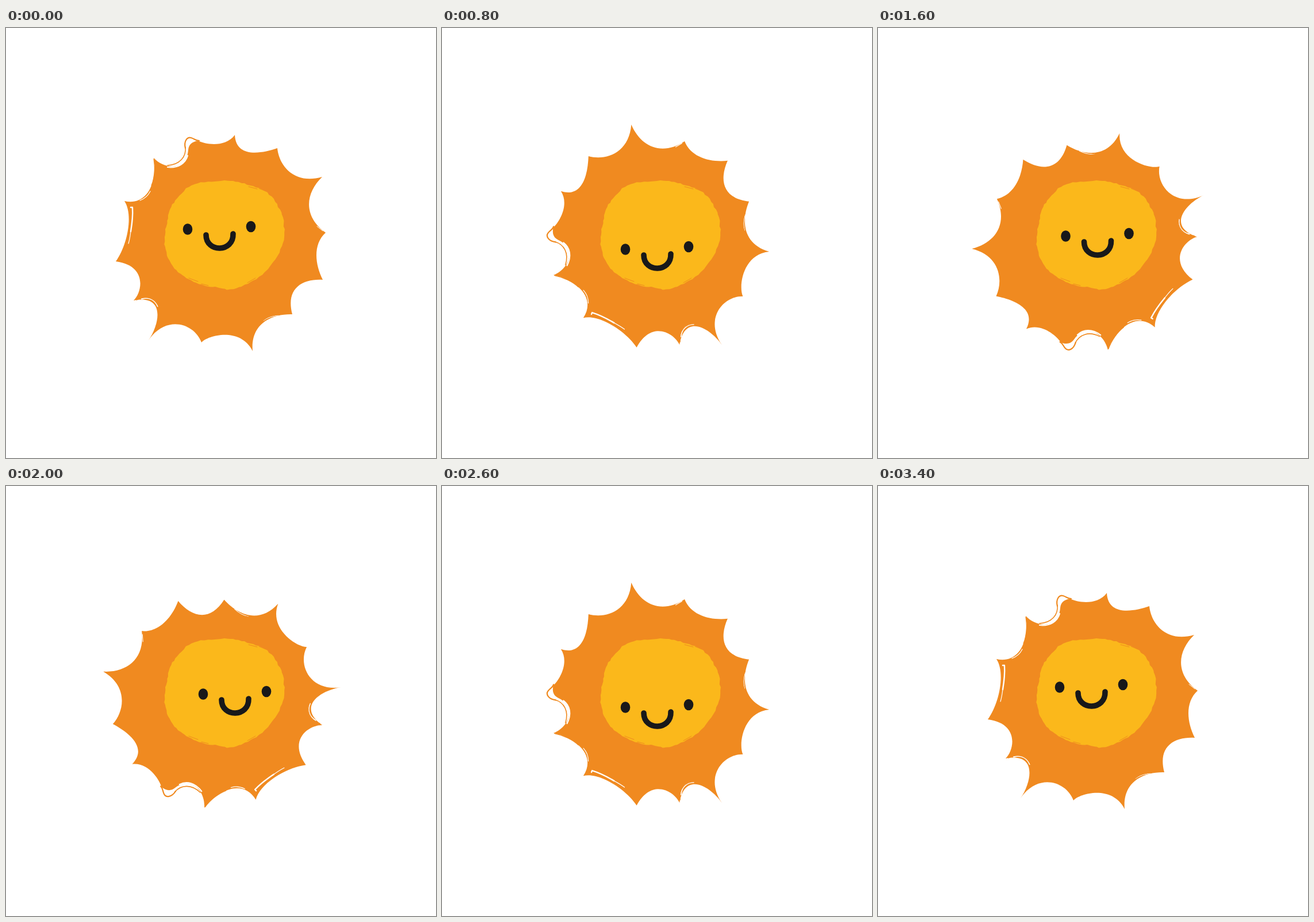
An HTML page for the animation above (3.6 s loop, 748x748 px).

```html
<!DOCTYPE html>
<html lang="en">
<head>
<meta charset="utf-8">
<title>Smiling sun</title>
<style>
  html, body { margin: 0; width: 100%; height: 100%; overflow: hidden; background: #fff; }
  svg { display: block; width: 100%; height: 100%; }
  .orange { fill: #f08a20; }
  .yellow { fill: #fbb81b; }
  .ink { fill: #18181a; }
  .line { fill: none; stroke-linecap: round; stroke-linejoin: round; }
  .gap { stroke: #fff; }
  .hair { stroke: #f08a20; }
</style>
</head>
<body>
<svg viewBox="0 0 748 748">
  <g id="rays">
    <path class="orange" d="M334 196
      C348 203 382 208 398 186 C400 226 443 219 472 209
      C475 240 502 273 550 259 C520 288 517 328 556 356
      C534 376 537 410 551 438 C516 436 486 452 498 498
      C461 497 425 515 429 562 C408 520 352 534 340 547
      C328 514 279 498 248 543 C268 514 277 463 222 474
      C238 458 245 413 191 406 C211 378 222 325 206 301
      C242 309 263 276 257 226 C275 246 314 250 317 212
      C318 202 324 198 334 196Z"/>
    <!-- dry brush streaks -->
    <g class="line gap">
      <path stroke-width="2.2" d="M316 222C312 236 299 244 281 242"/>
      <path stroke-width="2.4" d="M217 312L220 312"/>
      <path stroke-width="2.4" d="M220 313C221 328 219 342 217 354"/>
      <path stroke-width="1.2" d="M217 354C216 362 215 368 213 375"/>
      <path stroke-width="1.3" d="M258 238C258 250 256 260 254 269"/>
      <path stroke-width="1.2" d="M251 284C247 292 241 297 233 300"/>
      <path stroke-width="2.4" d="M236 471C250 467 260 474 264 484"/>
      <path stroke-width="1" d="M448 509C456 503 464 501 474 500"/>
      <path stroke-width="1" d="M541 345L551 353"/>
    </g>
    <g class="line hair">
      <path stroke-width="2.2" d="M312 209C309 197 315 189 322 191S329 196 336 196"/>
      <path stroke-width="1.6" d="M312 207C314 224 302 238 281 239"/>
      <path stroke-width="1.2" d="M257 228C260 244 258 262 253 274"/>
      <path stroke-width="1.5" d="M227 473C245 464 260 470 266 486"/>
      <path stroke-width="1" d="M443 514C450 504 462 499 476 499"/>
    </g>
  </g>
  <path id="disc" class="yellow"/>
  <g class="line hair" stroke-width="1">
    <path d="M422 276L437 280M440 279L452 284M318 435L334 441M340 445L352 448M420 443L434 435"/>
  </g>
  <g id="face">
    <ellipse class="ink" cx="316" cy="350" rx="8.3" ry="9.8"/>
    <ellipse class="ink" cx="426" cy="345.5" rx="8.3" ry="9.8"/>
    <path class="line" stroke="#18181a" stroke-width="9.6" d="M348 360C348 391 396 391 395 358"/>
  </g>
</svg>
<script>
  const $ = id => document.getElementById(id);
  const STEP = 200, COUNT = 9, LOOP = STEP * COUNT * 2;

  // Each pose: ray angle, face x, face y
  const poses = [
    [0, 0, 0], [-10, -5, 3.5], [-34.5, -18, 12],
    [-49.2, -9, 22], [-69.1, 3, 35], [-91.5, 24, 23],
    [-113.2, 45, 12], [-133, 27, 12], [-149.8, 10.5, 12]
  ];

  const rim = [
    [375, 266], [400, 267], [425, 274], [450, 283], [468, 302], [480, 325],
    [484, 350], [480, 380], [465, 408], [440, 433], [415, 447], [390, 455],
    [365, 451], [340, 447], [318, 437], [300, 425], [284, 405], [277, 380],
    [276, 360], [281, 335], [285, 315], [298, 296], [318, 276], [345, 268]
  ];

  let seed = 11;
  const rand = () => (seed = (seed * 16807) % 2147483647) / 2147483647;

  const spline = (a, b, c, d, t) =>
    b + t / 2 * (c - a + t * (2 * a - 5 * b + 4 * c - d + t * (3 * (b - c) + d - a)));

  function roughPath(pts, cuts, amount) {
    const n = pts.length, out = [];
    for (let i = 0; i < n; i++) {
      const [a, b, c, d] = [-1, 0, 1, 2].map(k => pts[(i + k + n) % n]);
      for (let j = 0; j < cuts; j++) {
        const at = k => spline(a[k], b[k], c[k], d[k], j / cuts) + (rand() - 0.5) * amount;
        out.push(at(0).toFixed(1) + " " + at(1).toFixed(1));
      }
    }
    return "M" + out.join("L") + "Z";
  }

  $("disc").setAttribute("d", roughPath(rim, 5, 2));

  function draw(now) {
    const i = Math.floor((now % LOOP) / STEP);
    const [angle, x, y] = poses[i < COUNT ? i : 2 * COUNT - 1 - i];
    $("rays").setAttribute("transform", `rotate(${angle} 373.5 373.7)`);
    $("face").setAttribute("transform", `translate(${x} ${y})`);
  }

  let start;
  function tick(now) {
    start ??= now;
    draw(now - start);
    requestAnimationFrame(tick);
  }
  draw(0);
  requestAnimationFrame(tick);
</script>
</body>
</html>
```
